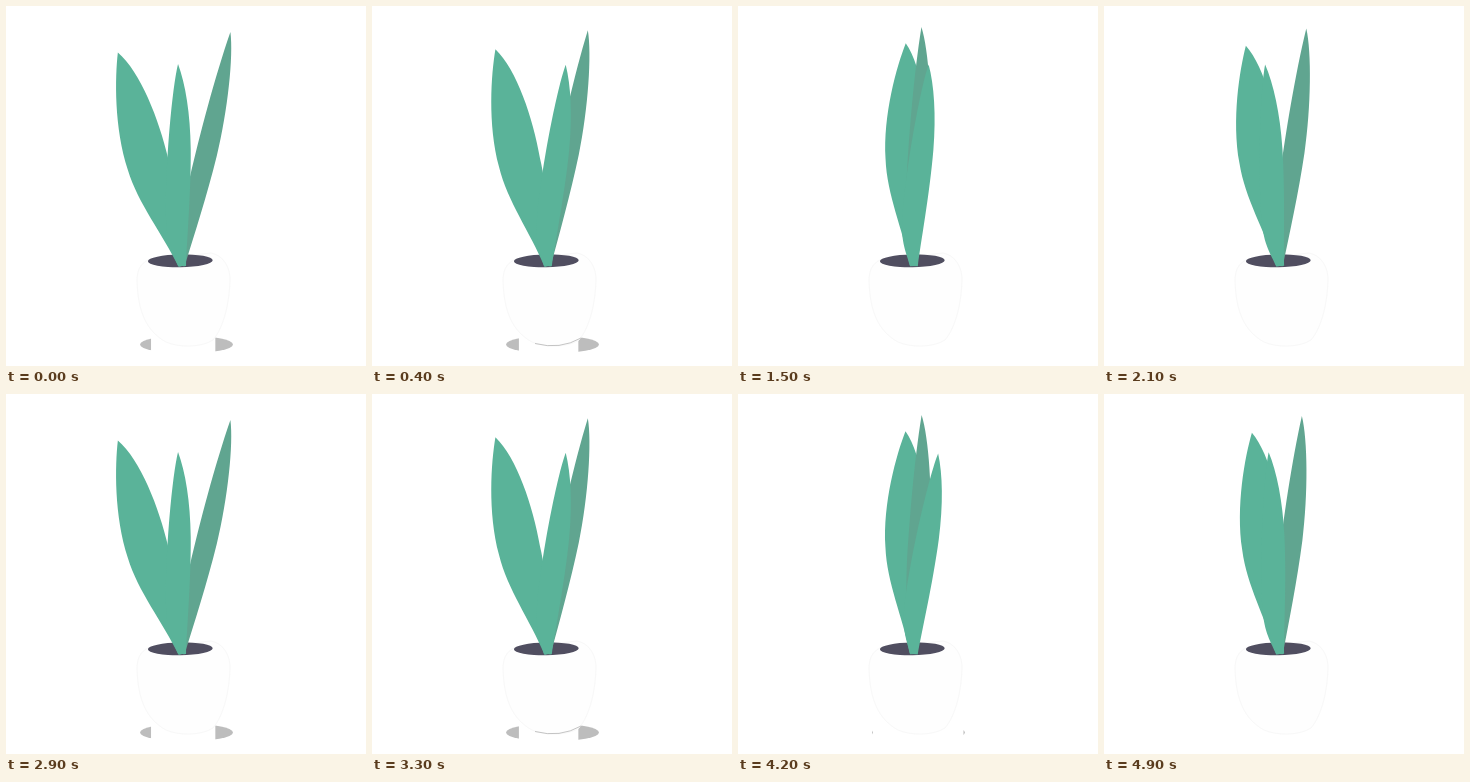
Recreate the animation shown at these times as an HTML page. Size 360 by 360 pixels, loop 5 s.

```html
<!DOCTYPE html>
<html lang="en">
<head>
<meta charset="utf-8">
<title>Swaying plant</title>
<style>
  html, body { margin: 0; width: 100%; height: 100%; overflow: hidden; background: #fff; }
  svg { display: block; width: 100vw; height: 100vh; }
</style>
</head>
<body>
<svg viewBox="0 0 360 360">
  <defs>
    <clipPath id="ends">
      <rect id="endL" x="134" y="325" width="0" height="30"/>
      <rect id="endR" x="227" y="325" width="0" height="30"/>
    </clipPath>
  </defs>
  <ellipse cx="180.5" cy="338.5" rx="46.5" ry="9" fill="#bdbdbd" clip-path="url(#ends)"/>
  <path d="M142 254 C134 258 131 265 131 275 C132 305 140 325 160 336 C172 341.5 195 342 207 334 C218 321 224 295 224 271 C223 259 216 249 205 247 Z"
        fill="#fefefe" stroke="#f8f8f8"/>
  <path id="rim" d="M163 337.5 Q188 344 209 332" fill="none" stroke="#bdbdbd"/>
  <ellipse cx="174.3" cy="254.8" rx="32.4" ry="6.4" fill="#504e60" transform="rotate(-1 174 255)"/>
  <path id="left" fill="#5ab399"
        d="M0-221 C-10-198-25.5-150-24.5-106 C-24.5-70-10-36-4 2 L3 2 C10-40 17-70 17.4-105 C20-145 16-196 0-221Z"/>
  <path id="right" fill="#60a590"
        d="M0-237 C8-214 13.5-160 12-113 C10.5-72 6-30 3 2 L-3 2 C-8-25-10-50-10-85 C-9-130-6-190 0-237Z"/>
  <path id="middle" fill="#5ab399"
        d="M0-200 C-6-178-15-100-15-45 C-15-20-8-10-4 2 L4 2 C5-20 10.5-70 11-115 C11.3-150 7-180 0-200Z"/>
</svg>
<script>
  const LOOP = 5000, SWAY = 2900, STEP = 100;
  const $ = id => document.getElementById(id);

  // Swings between -1 and 1, highest at the given time
  const swing = (t, peak) => Math.cos((t - peak) / SWAY * 2 * Math.PI);

  const turn = (id, angle) =>
    $(id).setAttribute("transform", `translate(176 258) rotate(${angle})`);

  function draw(time) {
    const t = Math.floor(time % LOOP / STEP) * STEP;
    const spread = swing(t, -40);
    turn("left", -9.45 - 7.45 * spread);
    turn("right", 6.75 + 5.05 * spread);
    turn("middle", 1.9 + 7.4 * swing(t, 920));

    // The shadow shows only at its two ends
    const shade = swing(t, 330);
    const end = Math.max(0, 5 + 8 * shade);
    $("endL").setAttribute("width", end);
    $("endR").setAttribute("x", 227 - 1.6 * end);
    $("endR").setAttribute("width", 1.6 * end);
    $("rim").setAttribute("opacity", Math.max(0, 10 * shade - 9));
  }

  const start = performance.now();
  function tick() {
    draw(performance.now() - start);
    requestAnimationFrame(tick);
  }
  tick();
</script>
</body>
</html>
```
